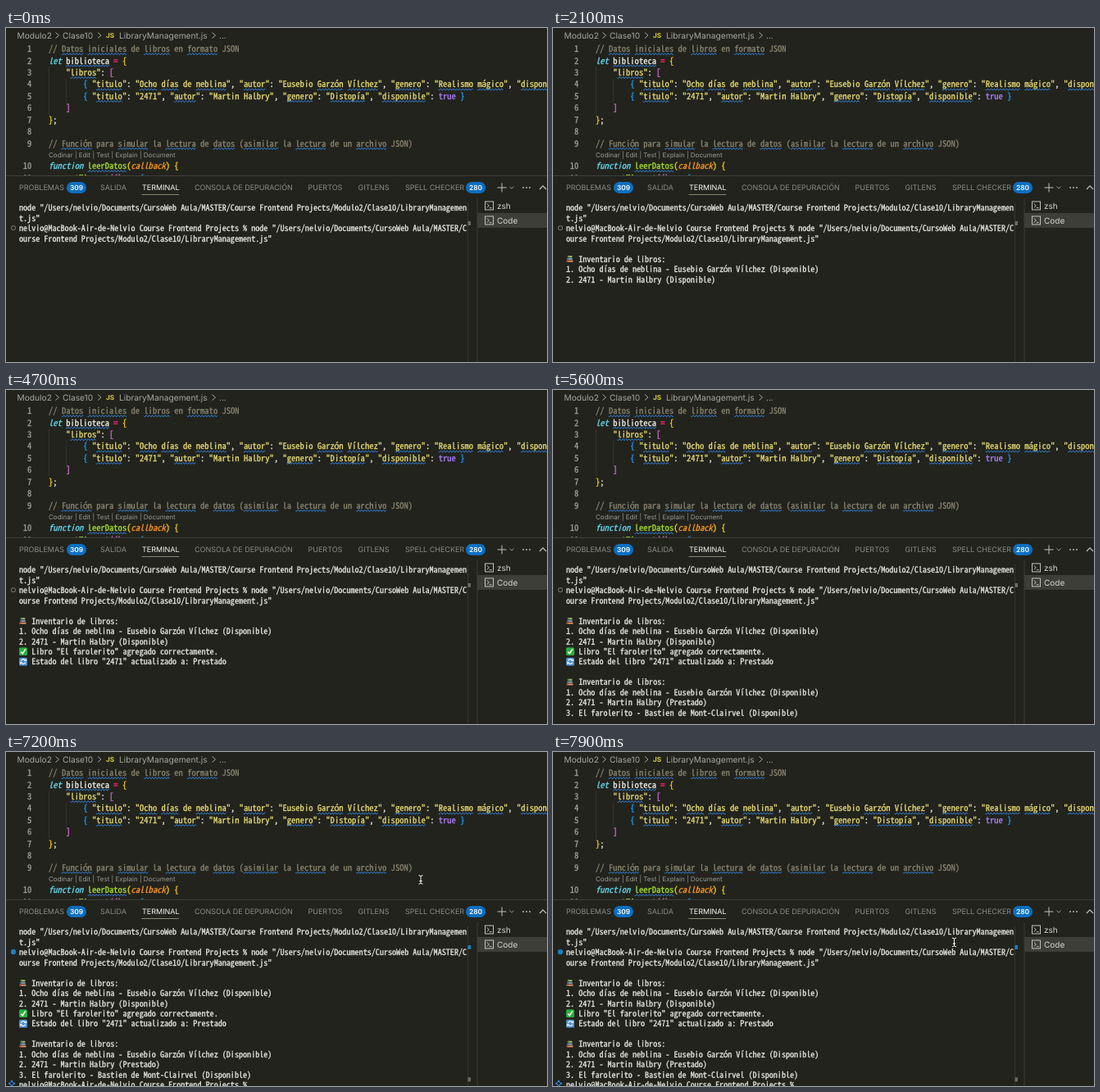
Write an HTML page with a canvas that moves like this. It is 660 px wide and 408 px high and loops after 8000 ms.

```html
<!DOCTYPE html>
<html lang="es">
<head>
<meta charset="utf-8">
<title>Terminal</title>
<style>
html, body { margin: 0; width: 100%; height: 100%; overflow: hidden; background: #22231d; }
canvas { display: block; width: 660px; height: 408px; }
</style>
</head>
<body>
<canvas id="stage" width="660" height="408"></canvas>
<script>
const ctx = document.getElementById('stage').getContext('2d');
const LOOP = 8000;
const MONO = '"Noto Sans Mono CJK JP", "Noto Sans Mono", monospace';
const SANS = 'Inter, sans-serif';
const EDITOR = { x: 52, y: 25.4, row: 14.45, pitch: 5.286, size: 10.5 };
const TERM = { x: 16, y: 219.6, row: 12.46, pitch: 5.056, size: 10.1 };

const C = {
  bg: '#22231d', line: '#3f4038', dim: '#8b8c85', white: '#f0f0ea', term: '#e6e6e0',
  comment: '#88846f', blue: '#66d9ef', pink: '#f92672', str: '#e6db74', gold: '#ffd700',
  orchid: '#da70d6', azure: '#179fff', violet: '#ae81ff', green: '#a6e22e', orange: '#fd971f',
  wave: '#3794ff', badge: '#0b6fc2', mark: '#1b81c4'
};

// Each code line: indent column, then [text, colour, italic] parts
const key = name => [[`"${name}"`, C.str], [': ', C.white]];
const field = (name, value) => [...key(name), [`"${value}"`, C.str], [', ', C.white]];
const book = (title, author, genre) => [
  8, ['{ ', C.azure], ...field('titulo', title), ...field('autor', author),
  ...field('genero', genre), ...key('disponible'), ['true', C.violet], [' }', C.azure]
];
const CODE = [
  [0, ['// Datos iniciales de libros en formato JSON', C.comment]],
  [0, ['let ', C.blue, 1], ['biblioteca ', C.white], ['= ', C.pink], ['{', C.gold]],
  [4, ...key('libros'), ['[', C.orchid]],
  [...book('Ocho días de neblina', 'Eusebio Garzón Vílchez', 'Realismo mágico'), [',', C.white]],
  book('2471', 'Martin Halbry', 'Distopía'),
  [4, [']', C.orchid]],
  [0, ['}', C.gold], [';', C.white]],
  [0],
  [0, ['// Función para simular la lectura de datos (asimilar la lectura de un archivo JSON)', C.comment]],
  [0, ['function ', C.blue, 1], ['leerDatos', C.green], ['(', C.gold], ['callback', C.orange, 1], [') {', C.gold]],
  [4, ['setTimeout', C.green], ['(() ', C.orchid], ['=> ', C.blue, 1], ['{', C.azure]]
];
const KNOWN = new Set(['JSON', 'para', 'function', 'callback', 'true', 'setTimeout', 'Eusebio', 'Martin', 'Halbry']);

const PROMPT = 'nelvio@MacBook-Air-de-Nelvio Course Frontend Projects %';
const DIR = '"/Users/nelvio/Documents/CursoWeb Aula/MASTER/C';
const FIRST = '1. Ocho días de neblina - Eusebio Garzón Vílchez (Disponible)';
// [row, time shown, text, emoji]
const OUTPUT = [
  [0, 0, `node ${DIR}ourse Frontend Projects/Modulo2/Clase10/LibraryManagemen`],
  [1, 0, 't.js"'],
  [2, 0, `${PROMPT} node ${DIR}`],
  [3, 0, 'ourse Frontend Projects/Modulo2/Clase10/LibraryManagement.js"'],
  [5, 700, '   Inventario de libros:', books],
  [6, 700, FIRST],
  [7, 700, '2. 2471 - Martin Halbry (Disponible)'],
  [8, 3200, '   Libro "El farolerito" agregado correctamente.', check],
  [9, 4700, '   Estado del libro "2471" actualizado a: Prestado', cycle],
  [11, 5600, '   Inventario de libros:', books],
  [12, 5600, FIRST],
  [13, 5600, '2. 2471 - Martin Halbry (Prestado)'],
  [14, 5600, '3. El farolerito - Bastien de Mont-Clairvel (Disponible)'],
  [15, 5700, PROMPT]
];
const DONE = 5700;

function sans(str, x, y, size, color, weight = 400) {
  ctx.font = `${weight} ${size}px ${SANS}`;
  ctx.fillStyle = color;
  ctx.fillText(str, x, y + size * 0.36);
}
// One character per grid cell; a hairline stroke gives the medium weight
function mono(str, x, y, grid, color, style = '') {
  ctx.font = `${style} ${grid.size}px ${MONO}`;
  ctx.fillStyle = ctx.strokeStyle = color;
  ctx.lineWidth = 0.3;
  ctx.textAlign = 'center';
  [...str].forEach((ch, i) => {
    const cx = x + (i + 0.5) * grid.pitch;
    ctx.fillText(ch, cx, y + 3.7);
    ctx.strokeText(ch, cx, y + 3.7);
  });
  ctx.textAlign = 'left';
}
function rect(x, y, w, h, color) {
  ctx.fillStyle = color;
  ctx.fillRect(x, y, w, h);
}
function box(x, y, w, h, r, color) {
  ctx.fillStyle = color;
  ctx.beginPath();
  ctx.roundRect(x, y, w, h, r);
  ctx.fill();
}
function path(color, width, ...lines) {
  ctx.strokeStyle = color;
  ctx.lineWidth = width;
  ctx.beginPath();
  for (const pts of lines)
    for (let i = 0; i < pts.length; i += 2) ctx[i ? 'lineTo' : 'moveTo'](pts[i], pts[i + 1]);
  ctx.stroke();
}
function chevron(x, y, color) {
  path(color, 1, [x - 2, y - 3.5, x + 2, y, x - 2, y + 3.5]);
}
function wave(x, y, w) {
  const pts = [];
  for (let i = 0; i <= w; i += 0.6) pts.push(x + i, y + 0.9 * Math.sin(i * 1.65));
  path(C.wave, 0.95, pts);
}

function books(x, y) {
  const tilt = [[1.8, -4, 5.5, '#5f8f4a'], [1, -1.2, 6.6, '#4a7090'], [0.4, 1.6, 8, '#a8563c']];
  for (const [dx, dy, w, color] of tilt) {
    box(x + dx, y + dy, w, 2.6, 0.6, color);
    rect(x + dx + 2, y + dy + 1.1, w - 2, 0.8, '#d8c9a4');
  }
}
function check(x, y) {
  box(x, y - 4.8, 10, 9.8, 1.6, '#25b13c');
  path('#fff', 1.5, [x + 2.2, y + 0.4, x + 4.2, y + 2.7, x + 7.8, y - 2.8]);
}
function cycle(x, y) {
  box(x, y - 4.8, 10, 9.8, 1.6, '#4c8fd0');
  ctx.strokeStyle = '#fff';
  ctx.lineWidth = 1.2;
  for (const a of [0.35, 0.35 + Math.PI]) {
    ctx.beginPath();
    ctx.arc(x + 5, y, 2.8, a, a + 2.3);
    ctx.stroke();
  }
  path('#fff', 1, [x + 6.3, y - 1.2, x + 8.4, y - 0.8, x + 8.4, y - 3], [x + 3.7, y + 1.2, x + 1.6, y + 0.8, x + 1.6, y + 3]);
}

function drawCode() {
  rect(EDITOR.x, 47, 1, 58, '#34352e');
  rect(EDITOR.x + 4 * EDITOR.pitch, 62, 1, 29, '#34352e');
  CODE.forEach(([indent, ...parts], i) => {
    const y = EDITOR.y + i * EDITOR.row + (i > 8 ? 13 : 0);
    const num = String(i + 1);
    mono(num, 31.2 - num.length * EDITOR.pitch, y, EDITOR, '#a0a099');
    let x = EDITOR.x + indent * EDITOR.pitch;
    for (const [str, color, italic] of parts) {
      mono(str, x, y, EDITOR, color, italic ? 'italic' : '');
      for (const m of str.matchAll(/\p{L}{4,}/gu))
        if (!KNOWN.has(m[0])) wave(x + m.index * EDITOR.pitch, y + 6.4, m[0].length * EDITOR.pitch);
      x += str.length * EDITOR.pitch;
    }
  });
}

function drawEditor() {
  ctx.save();
  ctx.beginPath();
  ctx.rect(0, 0, 660, 180);
  ctx.clip();
  const crumb = '#a6a7a0';
  sans('Modulo2', 13.5, 9, 10.2, crumb);
  sans('Clase10', 69, 9, 10.2, crumb);
  sans('LibraryManagement.js', 138, 9, 10.2, crumb);
  sans('...', 260, 9, 10.2, crumb);
  for (const x of [62.5, 114, 253.5]) chevron(x, 9, crumb);
  sans('JS', 122, 9.5, 8.2, '#d6cf3f', 700);
  drawCode();
  sans('Codinar | Edit | Test | Explain | Document', 52, 155.4, 8, '#999a92');
  ctx.restore();
}

function badge(x, w, label) {
  box(x, 188, w, 14, 7, C.badge);
  ctx.textAlign = 'center';
  sans(label, x + w / 2, 195, 8.4, '#fff', 600);
  ctx.textAlign = 'left';
}

function drawPanel() {
  rect(0, 180, 660, 1, C.line);
  const tabs = [['PROBLEMAS', 16], ['SALIDA', 115], ['CONSOLA DE DEPURACIÓN', 230],
    ['PUERTOS', 368.5], ['GITLENS', 429.5], ['SPELL CHECKER', 487]];
  for (const [name, x] of tabs) sans(name, x, 195, 9, C.dim);
  sans('TERMINAL', 166, 195, 9, '#f8f8f2');
  rect(165.5, 203, 45.5, 1, '#8a866f');
  badge(74, 24, '309');
  badge(561, 24, '280');

  const icon = '#c2c3bc';
  path(icon, 1, [599.5, 195, 610.5, 195], [605, 189.5, 605, 200.5]);
  path('#96978f', 1, [614.5, 193.5, 617, 196.2, 619.5, 193.5]);
  for (const x of [631, 635, 639]) box(x - 0.9, 194.1, 1.8, 1.8, 0.9, icon);
  path(icon, 1.2, [651, 197, 655, 192.8, 659, 197]);

  rect(575, 226, 85, 18, '#3d3e37');
  rect(563, 213, 1, 195, '#34352e');
  rect(574.5, 208, 1, 200, '#3b3c35');
  [['zsh', 217], ['Code', 235]].forEach(([name, y]) => {
    ctx.strokeStyle = icon;
    ctx.lineWidth = 1;
    ctx.strokeRect(584.5, y - 5, 10, 10);
    path(icon, 1, [586.8, y - 2.5, 589.3, y, 586.8, y + 2.5], [589.8, y + 2.7, 592.6, y + 2.7]);
    sans(name, 599, y, 10, '#d3d4cd');
  });
}

function drawTerminal(t) {
  for (const [row, from, str, emoji] of OUTPUT) {
    if (t < from) continue;
    const y = TERM.y + row * TERM.row;
    mono(str, TERM.x, y, TERM, C.term);
    if (emoji) emoji(TERM.x, y);
  }
  const done = t >= DONE;
  ctx.beginPath();
  ctx.arc(9, 244.2, done ? 3.1 : 2.6, 0, 7);
  if (done) {
    ctx.fillStyle = C.mark;
    ctx.fill();
  } else {
    ctx.strokeStyle = '#85867f';
    ctx.lineWidth = 0.9;
    ctx.stroke();
  }
  rect(563.5, 236, 3.5, 5, done ? C.mark : '#696a64');
  if (done) {
    rect(563.5, 397.5, 3.5, 5, '#696a64');
    path(C.wave, 1, [7, 401, 8.2, 403.8, 11, 405, 8.2, 406.2, 7, 409, 5.8, 406.2, 3, 405, 5.8, 403.8, 7, 401]);
  }
}

function drawPointer(t) {
  if (t < 7200) return;
  const p = (Math.floor(t / 100) - 72) / 7;
  const x = 506 - 16.5 * p, y = 156 + 76.5 * p;
  const beam = [[x - 2.5, y - 5.5, x, y - 4.3, x + 2.5, y - 5.5], [x, y - 4.3, x, y + 4.3],
    [x - 2.5, y + 5.5, x, y + 4.3, x + 2.5, y + 5.5], [x - 1.7, y + 1.6, x + 1.7, y + 1.6]];
  path('#111', 2.4, ...beam);
  path('#f4f4f4', 1.1, ...beam);
}

function frame(now) {
  const t = now % LOOP;
  rect(0, 0, 660, 408, C.bg);
  drawEditor();
  drawPanel();
  drawTerminal(t);
  drawPointer(t);
  requestAnimationFrame(() => frame(performance.now() - start));
}
ctx.textRendering = 'geometricPrecision';
const start = performance.now();
frame(0);
</script>
</body>
</html>
```
